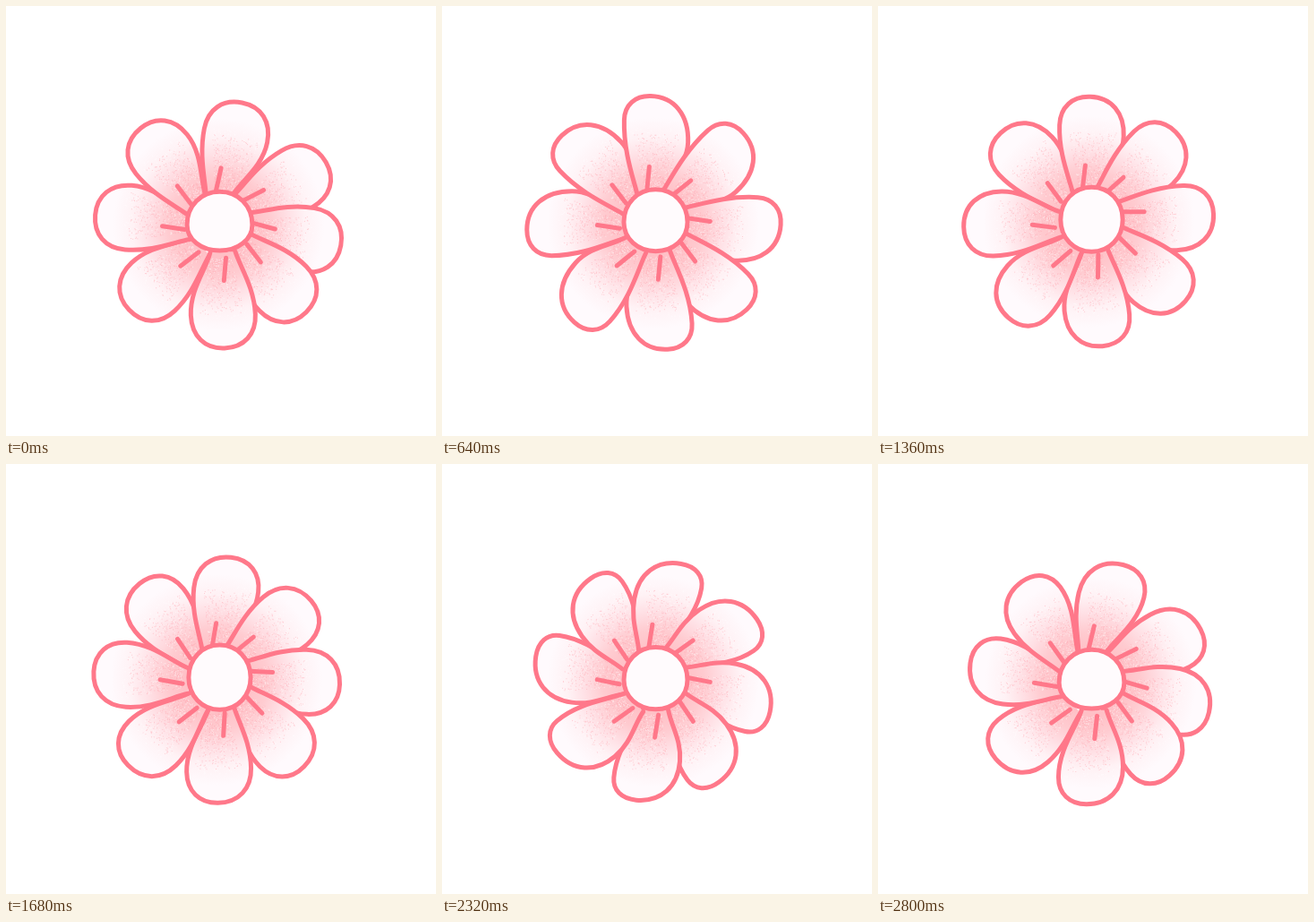
An HTML page that plays this animation: 480 by 480 pixels, repeating every 2880 ms.

```html
<!DOCTYPE html>
<html lang="en">
<head>
<meta charset="utf-8">
<title>Swinging flower</title>
<style>
  html, body { margin: 0; width: 100%; height: 100%; overflow: hidden; background: #fff; }
  svg { display: block; width: 100%; height: 100%; }
  .line { fill: none; stroke: #ff788a; stroke-width: 5; stroke-linecap: round; stroke-linejoin: round; }
  #stage .heart { fill: #fffbfd; }
</style>
</head>
<body>
<svg id="stage" viewBox="0 0 480 480">
  <defs>
    <radialGradient id="blush" gradientUnits="userSpaceOnUse" cx="0" cy="0" r="118">
      <stop offset=".3" stop-color="#ffc0c6"/>
      <stop offset=".48" stop-color="#ffcbd0"/>
      <stop offset=".65" stop-color="#ffdfe4"/>
      <stop offset=".82" stop-color="#fff2f5"/>
      <stop offset="1" stop-color="#fffafd"/>
    </radialGradient>
  </defs>
</svg>
<script>
const LOOP = 2880, STEP = 80, PEAK = 1600;
const SWING = 86.5, PETALS = 8, ROOT = 31;
const rad = deg => deg * Math.PI / 180;
const cos = deg => Math.cos(rad(deg));
const sin = deg => Math.sin(rad(deg));

// Clockwise swing with a quick start, then back with a slow one.
const ease = x => (1 - Math.cos(Math.PI * x)) / 2;
function turn(time) {
  const t = (time + LOOP) % LOOP;
  return SWING * (t < PEAK
    ? ease((t / PEAK) ** .78)
    : 1 - ease(((t - PEAK) / (LOOP - PEAK)) ** 1.25));
}

let seed = 7;
const rnd = () => (seed = seed * 16807 % 2147483647) / 2147483647;

const stage = document.getElementById("stage");
function add(parent, name, attrs) {
  const el = document.createElementNS("http://www.w3.org/2000/svg", name);
  for (const k in attrs) el.setAttribute(k, attrs[k]);
  parent.appendChild(el);
  return el;
}

function grain(count, reach) {
  let d = "";
  for (let i = 0; i < count; i++) {
    const u = 38 + reach * Math.pow(rnd(), 1.25);
    const v = (rnd() * 2 - 1) * (4 + .23 * u);
    d += `M${v.toFixed(1)} ${(-u).toFixed(1)}h1`;
  }
  return d;
}

const petals = [];
for (let k = 0; k < PETALS; k++) {
  // The stack starts at the lower left; each petal covers the one before.
  const phi = (k + 5) % PETALS * 360 / PETALS;
  const g = add(stage, "g", {});
  const fill = add(g, "path", { fill: "url(#blush)" });
  add(g, "path", { d: grain(260, 62), stroke: "#ff9ba6", "stroke-opacity": .45 });
  add(g, "path", { d: grain(190, 68), stroke: "#fff", "stroke-opacity": .5 });
  const edge = add(g, "path", { class: "line" });
  const ray = add(g, "path", { class: "line", d: "M-4.5-38L0-63" });
  petals.push({ phi, g, fill, edge, ray });
}
const heart = add(stage, "path", { class: "line heart" });

const path = parts => parts.map(p => typeof p === "number" ? p.toFixed(2) : p).join(" ");

// A petal pointing up; skew pushes its tip and its wide side clockwise.
function petalPath(lean, skew, size) {
  const b = -36 * sin(lean + 2), w = 14, k = .61;
  const tip = 138 * size, tv = 9 * skew;
  const lu = (101 - 12 * skew) * size, ru = (101 + 14 * skew) * size;
  const lv = -36.5, rv = 35.5;
  return path([
    "M", b - w, -ROOT,
    "C", b - w - 5, -ROOT - 18, lv, -lu + .42 * (lu - ROOT), lv, -lu,
    "C", lv, -lu - k * (tip - lu), tv + k * (lv - tv), -tip, tv, -tip,
    "C", tv + k * (rv - tv), -tip, rv, -ru - k * (tip - ru), rv, -ru,
    "C", rv, -ru + .42 * (ru - ROOT), b + w + 5, -ROOT - 18, b + w, -ROOT
  ]);
}

// An oval whose widest line sags below its middle.
function heartPath(x, y, rx, ry, sag) {
  const m = y + sag, k = .57, up = ry + sag, dn = ry - sag;
  return path([
    "M", x - rx, m,
    "C", x - rx, m - k * up, x - k * rx, y - ry, x, y - ry,
    "C", x + k * rx, y - ry, x + rx, m - k * up, x + rx, m,
    "C", x + rx, m + k * dn, x + k * rx, y + ry, x, y + ry,
    "C", x - k * rx, y + ry, x - rx, m + k * dn, x - rx, m, "Z"
  ]);
}

function draw(t) {
  const angle = turn(t);
  const speed = (turn(t + STEP) - turn(t - STEP)) / 2;
  const skew = -Math.tanh(speed / 5);        // tips drag behind the swing
  const side = 1 - 2 * angle / SWING;        // 1 at rest, -1 at the far end
  const size = 1 - .03 * skew;
  const cx = 236.3 + 1.2 * side, cy = 242.3 + 1.5 * side;

  for (const { phi, g, fill, edge, ray } of petals) {
    // Petals bunch up on one side, then on the other.
    const bunch = 5 * side * cos(phi - 40) + 1.5 * (1 + side) * cos(2 * phi - 120);
    const lean = 6 + 2.5 * skew + 3 * cos(phi + 10);
    const d = petalPath(lean, skew, size);
    const dir = phi + angle + bunch + lean;
    g.setAttribute("transform", path(["translate(", cx, cy, ") rotate(", dir, ")"]));
    fill.setAttribute("d", d);
    edge.setAttribute("d", d);
    ray.setAttribute("transform", path(["rotate(", -lean, ")"]));
  }
  heart.setAttribute("d",
    heartPath(238.5, 239.2 + side, 35.5 + .9 * side, 34.5 - 1.6 * side, 2 + 2 * side));
}

const start = performance.now();
function tick(now) {
  const t = Math.max(0, now - start) % LOOP;
  draw(Math.floor(t / STEP) * STEP);
  requestAnimationFrame(tick);
}
draw(0);
requestAnimationFrame(tick);
</script>
</body>
</html>
```
